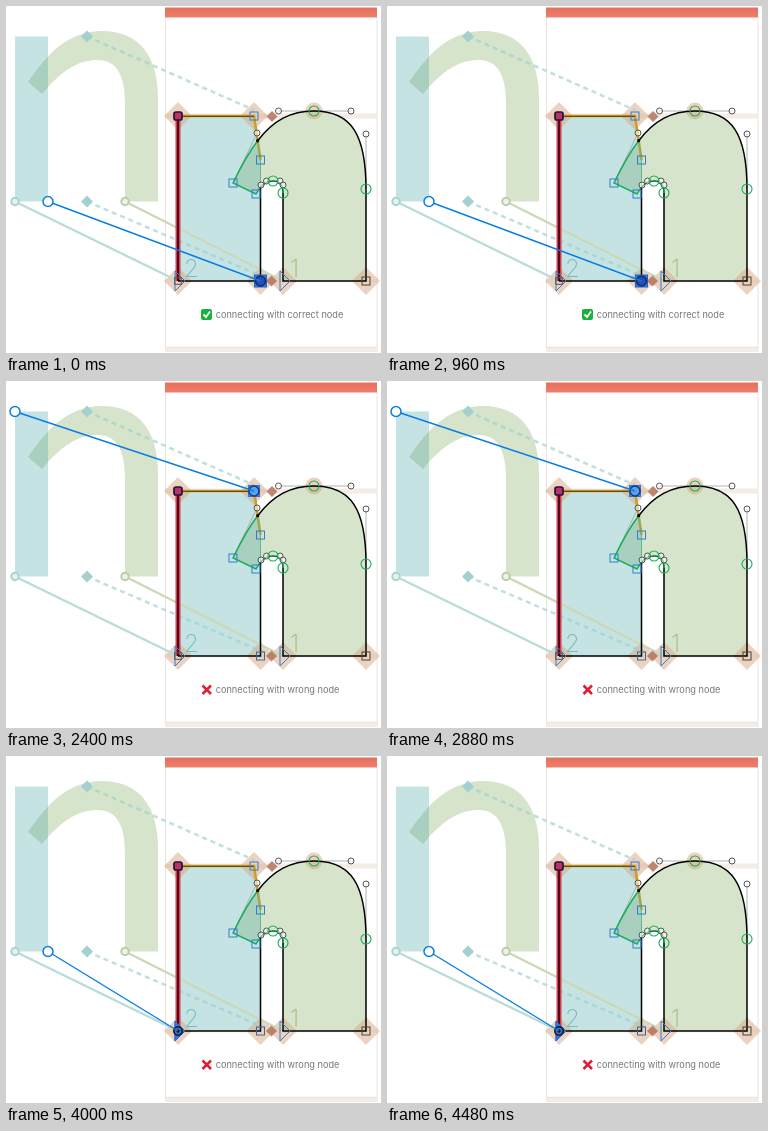
An HTML page for the animation above (4.8 s loop, 375x347 px).

```html
<!DOCTYPE html>
<html lang="en">
<head>
<meta charset="utf-8">
<title>Connecting nodes</title>
<style>
html, body { margin: 0; width: 100%; height: 100%; overflow: hidden; background: #fff; }
svg { display: block; width: 375px; height: 347px; }
text { font-family: Inter, "Open Sans", sans-serif; }
</style>
</head>
<body>
<svg id="stage" viewBox="0 0 375 347" fill="none"></svg>
<script>
const svg = document.getElementById("stage");
const TEAL = "#c5e3e3", GREEN = "#d6e4cb", OVERLAP = "#a9cfbf", NODE_GREEN = "#16ad5b", BLUE = "#2f7fd0";

function add(tag, attrs, parent = svg) {
  const el = document.createElementNS("http://www.w3.org/2000/svg", tag);
  for (const key in attrs) el.setAttribute(key, attrs[key]);
  parent.append(el);
  return el;
}
const path = (d, attrs, parent) => add("path", { d, ...attrs }, parent);
const line = (d, stroke, width = 1, extra = {}) => path(d, { stroke, "stroke-width": width, ...extra });
const rect = (x, y, width, height, fill, parent) => add("rect", { x, y, width, height, fill }, parent);
const circle = (cx, cy, r, stroke, width = 1, fill = "none", parent) =>
  add("circle", { cx, cy, r, stroke, "stroke-width": width, fill }, parent);
const square = (x, y, r, stroke, fill = "none", parent) =>
  add("rect", { x: x - r, y: y - r, width: 2 * r, height: 2 * r, stroke, fill }, parent);
const diamond = (x, y, r, fill, opacity = 1) =>
  path(`M${x} ${y - r}l${r} ${r}l${-r} ${r}l${-r} ${-r}z`, { fill, opacity });
const triangle = (x, y, attrs, parent) => path(`M${x - 3} ${y - 10}L${x + 7} ${y}L${x - 3} ${y + 10}Z`, attrs, parent);

// A stem and an arch, with a darker tone where they overlap.
function glyph(id, stem, arch) {
  path(stem, { fill: TEAL });
  path(arch, { fill: GREEN });
  path(stem, {}, add("clipPath", { id }));
  path(arch, { fill: OVERLAP, "clip-path": `url(#${id})` });
}

// Editor window
rect(159, 107.5, 212, 5, "#f4ede6");
rect(159, 273, 212, 4, "#faf6f2");
line("M159.5 11V346M371 11V346", "#ece3dc");
rect(159, 341, 212.5, 5, "#f4ece6");
line("M159 341.3H371", "#e8dfd8", .8);
const bar = add("linearGradient", { id: "bar", x2: 0, y2: 1 });
add("stop", { offset: 0, "stop-color": "#e66f5b" }, bar);
add("stop", { offset: 1, "stop-color": "#ec7f6c" }, bar);
rect(159, 1.5, 212, 10, "url(#bar)");

// Glyphs
glyph("leftStem", "M9 30.5H42V195.5H9Z",
  "M22 76C42 46 64 25 96 25C134 25 152 51 152 92V195.5H119V98C119 68 110 54 92 54C73 54 57 63 36 88Z");
glyph("rightStem", "M172 110H248L254.5 154V275H172Z",
  "M227 177C251 127 272 105 308 105C345 105 360 128 360 183V275H277V187C277 179 274 175 267 175C260 175 255 179 250 188Z");

// Soft node halos
for (const [x, y] of [[172, 110], [248, 110], [172, 275], [254.5, 275], [277, 275], [360, 275]])
  diamond(x, y, 14, "#d8a47e", .48);
circle(308, 105, 8.5, "none", 0, "rgba(216,164,126,.5)");

// Guides from the left glyph
const dash = { "stroke-dasharray": "5 4", opacity: .65 };
line("M81 30.5L248 104", "#9fcfcc", 2.5, dash);
line("M81 195.5L262 273", "#9fcfcc", 2.5, dash);
line("M9 195.5L172 275", "#badcd9", 2.5);
line("M119 195.5L277 275", "#cad9b8", 2.5);
diamond(81, 30.5, 6, "#a4d1cf");
diamond(81, 195.5, 6, "#a4d1cf");
circle(9, 195.5, 3.7, "#a9d3d0", 2, "#e5f2f1");
circle(119, 195.5, 3.7, "#bccca9", 2, "#eef3e9");

// Layer numbers
for (const [x, label, fill] of [[178, "2", "#7bb8b9"], [284, "1", "#a6b77e"]])
  add("text", { x, y: 271, fill, "font-size": 24, "font-weight": 200 }).textContent = label;

// Outlines and handles
line("M227 177L251 127M272 105H345M360 128V183", "#aaa", .9);
line("M172 110V275", "#d43b4e", 5);
line("M172 110V275", "#3a0a14", 1.8);
line("M172 110H248L254.5 154", "#cf9e24", 2.6);
line("M172 110.3H248", "#4e3c0c", 1);
line("M251.9 134.5L254.5 154V181", "#62b98b", 1);
line("M251.9 134.5C243.4 145.4 235.4 159.5 227 177L250 188C255 179 260 175 267 175C274 175 277 179 277 187", NODE_GREEN, 1.5);
line("M251.9 134.5C267.5 114.3 284.6 105 308 105C345 105 360 128 360 183V275H277V187", "#000", 1.5);
line("M254.5 181V275H172", "#000", 1.5);
line("M254.5 181C258 177 262 175 267 175C274 175 277 179 277 187", "#17663d", 1.2);
circle(251.7, 134.7, 1.6, "none", 0, "#000");

// Nodes
for (const [x, y] of [[272.5, 105], [345, 105], [360, 128], [251, 127], [255, 179], [260.5, 175], [274, 175], [277, 179]])
  circle(x, y, 3, "#555", 1, "rgba(255,255,255,.55)");
for (const [x, y] of [[308, 105], [360, 183], [267, 175], [277, 187]])
  circle(x, y, 5, NODE_GREEN, 1.1);
for (const [x, y] of [[248, 110], [254.5, 154], [227, 177], [250, 188]])
  square(x, y, 4, BLUE);
square(254.5, 275, 4, "#36689c");
square(360, 275, 4, "#4a4035");
for (const x of [172, 277]) triangle(x, 275, { stroke: BLUE });
square(172, 275, 3.3, "#555");
add("rect", { x: 168, y: 106, width: 8, height: 8, rx: 2, fill: "#bb3267", stroke: "#25133f", "stroke-width": 1.7 });
diamond(266, 110.5, 5.5, "#b87963", .9);
diamond(265.5, 275, 5.5, "#b87963", .9);

// Each step joins a point of the left glyph to a node on the right.
const steps = [
  { at: 0, from: [42, 195.5], to: [254.5, 275], node: "circle", right: true },
  { at: 1600, from: [42, 30.5], to: [254.5, 154], node: "dot" },
  { at: 2400, from: [9, 30.5], to: [248, 110], node: "ring" },
  { at: 3200, from: [9, 195.5], to: [172, 110], node: "dark", tint: "#c9e5f6" },
  { at: 4000, from: [42, 195.5], to: [172, 275], node: "triangle" }
];
const LOOP = 4800;

const markers = {
  circle(x, y, g) {
    square(x, y, 6, "#2860c8", "#3979df", g);
    circle(x, y, 5, "#102b70", 1.5, "#234fb0", g);
  },
  dot(x, y, g) {
    square(x, y, 5.5, "#2862cf", "#3979df", g);
    circle(x, y, 4, "#132c69", 1.5, "#2452aa", g);
  },
  ring(x, y, g) {
    square(x, y, 5.5, "#2f73dc", "#4387e6", g);
    circle(x, y, 5, "#123a83", 1.5, "#5b9eea", g);
  },
  dark(x, y, g) {
    square(x, y, 6, "#264da8", "#3155a8", g);
    circle(x, y, 5.3, "#12102c", 1.5, "#21102f", g);
  },
  triangle(x, y, g) {
    triangle(x, y, { fill: "#3477dc", stroke: "#2862cf" }, g);
    circle(x, y, 4.2, "#101c3b", 1.6, "#426ea8", g);
    circle(x, y, 1.5, "none", 0, "#000", g);
  }
};

function buildStep({ from, to, node, right, tint = "#fff" }) {
  const g = add("g", { visibility: "hidden" });
  markers[node](...to, g);
  path(`M${from}L${to}`, { stroke: "#087ee5", "stroke-width": 1.4 }, g);
  circle(...from, 5, "#087ee5", 1.5, tint, g);
  if (right) {
    add("rect", { x: 195, y: 303, width: 11, height: 11, rx: 2, fill: "#16b23b" }, g);
    path("M197.5 308.5L200 311L204 305.5", { stroke: "#fff", "stroke-width": 1.8 }, g);
  } else {
    path("M196.5 304.5L205 313M205 304.5L196.5 313", { stroke: "#df1e35", "stroke-width": 2.5 }, g);
  }
  add("text", { x: 209.7, y: 312, "font-size": 9.2, fill: "#777" }, g).textContent =
    `connecting with ${right ? "correct" : "wrong"} node`;
  return g;
}
const layers = steps.map(buildStep);

function render(time) {
  const t = time % LOOP;
  const current = steps.findLastIndex(step => t >= step.at);
  layers.forEach((g, i) => g.setAttribute("visibility", i === current ? "visible" : "hidden"));
}

const start = performance.now();
function tick() {
  render(performance.now() - start);
  requestAnimationFrame(tick);
}
tick();
</script>
</body>
</html>
```
